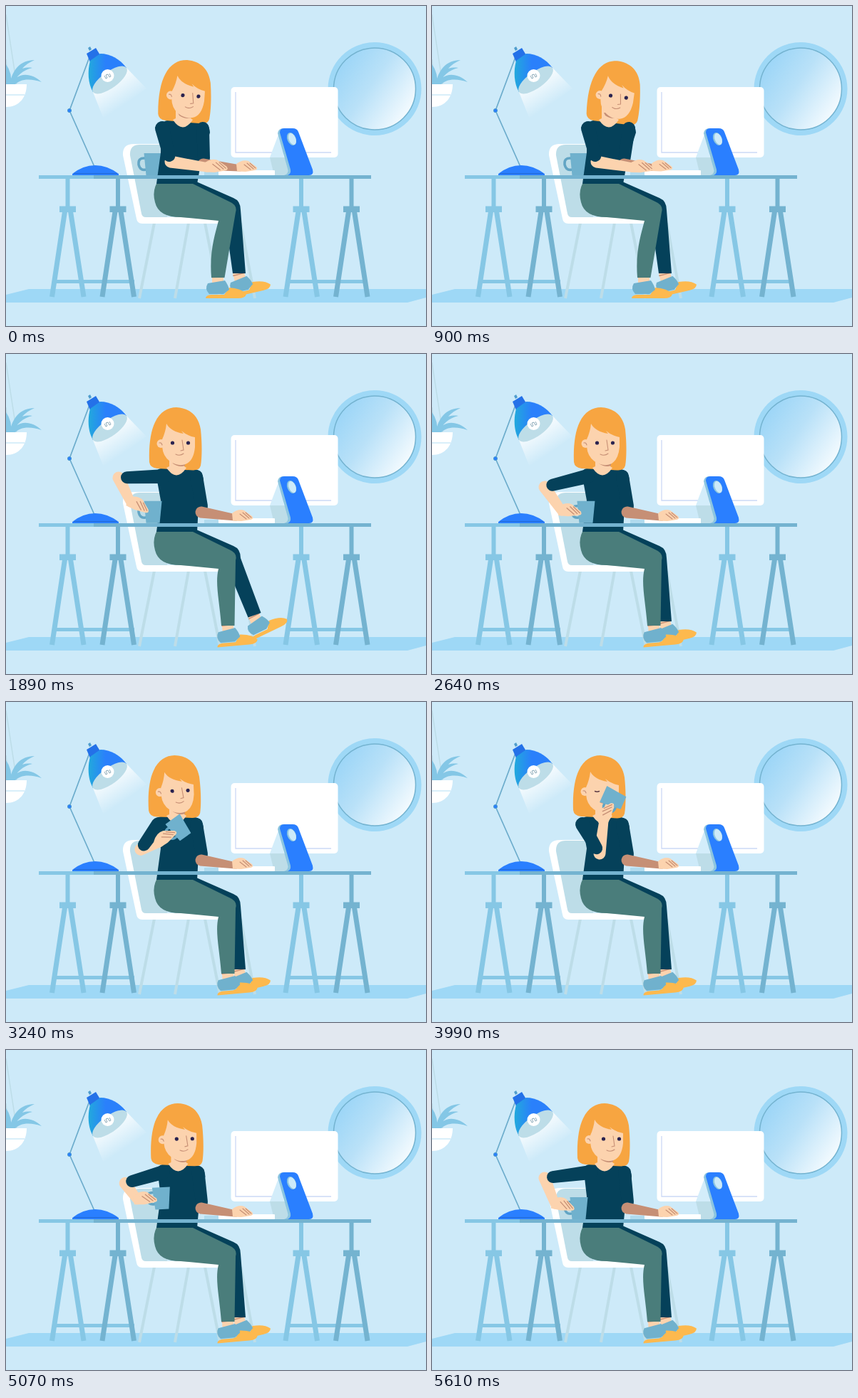
Write an HTML page that moves like this. It is 589 by 450 pixels and loops after 5.64 s.

```html
<!DOCTYPE html>
<html lang="en">
<head>
<meta charset="utf-8">
<title>At the desk</title>
<style>
html, body { margin: 0; width: 100%; height: 100%; overflow: hidden; background: #cdeaf9; }
svg { display: block; width: 589px; height: 450px; }
</style>
</head>
<body>
<svg viewBox="0 0 589 450" fill="none">
  <defs>
    <linearGradient id="glass" x1=".1" y1=".2" x2=".9" y2=".75">
      <stop stop-color="#9dd6f7"/><stop offset=".45" stop-color="#b9e1f8"/><stop offset="1" stop-color="#f0f9fe"/>
    </linearGradient>
    <linearGradient id="beam" gradientUnits="userSpaceOnUse" x1="146" y1="104" x2="168" y2="138">
      <stop stop-color="#fff" stop-opacity=".85"/><stop offset="1" stop-color="#fff" stop-opacity="0"/>
    </linearGradient>
    <linearGradient id="hood">
      <stop stop-color="#22a9dc"/><stop offset=".45" stop-color="#2a80fb"/>
    </linearGradient>
    <g id="trestle">
      <path d="M-3 243h6v39h-6zM-11.500 281.500h23v8.500h-23z" fill="currentColor"/>
      <path d="M-4 289L-22 409M4 289L22.500 409" stroke="currentColor" stroke-width="7"/>
    </g>
  </defs>

  <path d="M0 406L32 398H589V410L563 417H0z" fill="#9ed8f6"/>

  <circle cx="517" cy="116.500" r="65.500" fill="#9ed8f6"/>
  <circle cx="517" cy="116.500" r="57.500" fill="url(#glass)" stroke="#74b3d0" stroke-width="1.500"/>

  <path d="M0 12L15 111M0 75L3 111" stroke="#bddde8" stroke-width="1.500"/>
  <path d="M5 112C8 90 20 76 40 76C26 82 16 92 10 112zM5 112C10 90 24 85 37 87C24 90 14 98 9 112zM6 112C14 93 34 92 50 107C36 102 20 101 11 112zM0 82Q9 94 7 112H0z" fill="#84c7e6"/>
  <path d="M0 110H29C29 129 18 142 0 142z" fill="#fff"/>
  <path d="M0 125H26" stroke="#cdeaf9" stroke-width="1.500"/>

  <path d="M122 121L169 87L197 116L137 159z" fill="url(#beam)"/>
  <path d="M117 72L89 147L124 226" stroke="#6caccc" stroke-width="1.700"/>
  <circle cx="89" cy="147" r="2.600" fill="#2a7fff" stroke="#4f9dcc"/>
  <path d="M115 59l3-2 2 4-3 2z" fill="#4f9dcc"/>
  <path d="M113 67L126 59L132 69L118 79z" fill="#2471e8"/>
  <path d="M122 121C115 109 114 92 118 77L132 67C147 67 160 75 169 87z" fill="url(#hood)"/>
  <ellipse cx="145.500" cy="104" rx="29" ry="11.500" transform="rotate(-36 145.500 104)" fill="#bddde8"/>
  <circle cx="142.500" cy="98" r="9" fill="#fff"/>
  <path d="M138 98l2 4 2-1-2-4 3-1 2 4 2-1-2-4" stroke="#8aa9b8"/>
  <path d="M93 238V236Q108 224 125 224Q142 224 158 236V238z" fill="#2a7fff"/>
  <path d="M95 235.500H156" stroke="#1f68d8"/>

  <path d="M208 305L187 411M256 305L237 411M279 305L300 411M329 305L349 411" stroke="#bddde8" stroke-width="4"/>
  <path d="M164 210Q163 194 179 194H215V297H300V306H191Q184 306 183 299z" fill="#fff"/>
  <path d="M174 210Q173 195 188 195H226V297H196Q191 297 190 292z" fill="#bddde8"/>

  <path d="M67 387.500H180M396 387.500H507" stroke="#86c7e5" stroke-width="5"/>
  <g color="#86c7e5"><use href="#trestle" x="86.500"/><use href="#trestle" x="414"/></g>
  <g color="#74b3d0"><use href="#trestle" x="157"/><use href="#trestle" x="484.500"/></g>

  <g id="body"></g>

  <path d="M46 238H123V243H46z" fill="#86c7e5"/>
  <path d="M123 238H512V243H123z" fill="#74b3d0"/>
  <rect x="315.500" y="114" width="150" height="99" rx="5" fill="#fff"/>
  <path d="M322 121V206H456" stroke="#ccd9f6" stroke-width="1.300"/>
  <path d="M383 178L370 213H390z" fill="#d3edfa"/>
  <path d="M370 213H395V238H376z" fill="#bddde8"/>
  <path d="M381 179Q382 172 389 172H396L408 238H390Q397 236 395 229z" fill="#8cc5e0"/>
  <path d="M384 178Q384 172 390 172H402Q408 172 410 177L430 230Q432 238 425 238H395Q400 236 399 230z" fill="#2a7fff"/>
  <ellipse cx="400.500" cy="187" rx="6" ry="9.500" transform="rotate(-22 400.500 187)" fill="#8cc5e0"/>
  <ellipse cx="401.500" cy="187" rx="4.800" ry="8.500" transform="rotate(-22 401.500 187)" fill="#cdeaf9"/>
  <path d="M278 233H300V238H278z" fill="#b0daee"/>
  <rect x="298" y="231" width="79" height="7" rx="1" fill="#fff"/>

  <g id="arms"></g>
</svg>
<script>
const LOOP = 5640, GRAB = 1680;
const NAVY = '#05415a', GREEN = '#4a7d7b', SKIN = '#fcd3ae', SHADE = '#c68f75',
      HAIR = '#f7a541', TEAL = '#70b1cd', SHOE = '#fdb94e';

// The upper body: torso shift, head place and lean, gaze, shoulder, elbow, wrist, hand angle
const typing = { body: 9, headX: 12, headY: 1, lean: 2, gaze: 1, shoulder: 219,
                 elbowX: 231, elbowY: 219, wristX: 283, wristY: 227, angle: 0 };
const glance = { ...typing, headX: 15, headY: 2, lean: 4, gaze: -1 };
const hold = { body: 0, headX: 0, headY: 0, lean: 0, gaze: 0, shoulder: 222,
               elbowX: 158, elbowY: 174, wristX: 175, wristY: 209, angle: 24 };
const nudge = { ...hold, headX: -2, shoulder: 218, elbowY: 187, wristX: 182, wristY: 221, angle: 3 };
const lower = { ...hold, lean: -2, gaze: 2, shoulder: 211,
                elbowX: 208, elbowY: 220, wristX: 236, wristY: 183, angle: -60 };
const sip = { ...lower, headX: -3, lean: 0, gaze: 1, elbowX: 235, elbowY: 213, wristX: 241, wristY: 167, angle: -66 };
const place = { ...hold, body: 3, headX: 3, gaze: 4, elbowY: 180, wristX: 172.5, wristY: 217, angle: 10 };

const MOVES = [
  [glance, 0, 500], [hold, 1120, GRAB], [nudge, 2300, 2620], [lower, 2720, 3620],
  [sip, 3500, 3850], [lower, 4350, 4680], [place, 4650, 5230]
];

function ease(t, from, to) {
  const u = Math.min(1, Math.max(0, (t - from) / (to - from)));
  return u * u * (3 - 2 * u);
}

function poseAt(t) {
  const pose = { ...typing };
  for (const [goal, from, to] of MOVES)
    for (const k in pose) pose[k] += (goal[k] - pose[k]) * ease(t, from, to);
  return pose;
}

const path = (d, fill) => `<path d="${d}" fill="${fill}"/>`;
const line = (d, color = SHADE, w = 1.1) =>
  `<path d="${d}" stroke="${color}" stroke-width="${w}" stroke-linecap="round"/>`;
const dot = (x, y, r, fill) => `<circle cx="${x}" cy="${y}" r="${r}" fill="${fill}"/>`;
const at = (x, y, turn, inner, size = 1) =>
  `<g transform="translate(${x} ${y}) rotate(${turn}) scale(${size})">${inner}</g>`;

// tapered limb with round ends
function limb(x1, y1, r1, x2, y2, r2, fill) {
  const a = Math.atan2(y2 - y1, x2 - x1), nx = -Math.sin(a), ny = Math.cos(a);
  return path(`M${x1 + nx * r1} ${y1 + ny * r1}A${r1} ${r1} 0 0 1 ${x1 - nx * r1} ${y1 - ny * r1}` +
    `L${x2 - nx * r2} ${y2 - ny * r2}A${r2} ${r2} 0 0 1 ${x2 + nx * r2} ${y2 + ny * r2}z`, fill);
}

const hand = (x, y, turn, size) => at(x, y, turn,
  path('M-5 -5Q4 -12 12 -9L23 -1Q26 3 21 4L8 6L-4 5.500z', SKIN) +
  line('M6 -4L15 3M10 -6L19 2M14 -6L22 1'), size);

const mug = (x, y, turn) => at(x, y, turn,
  line('M-11 -9Q-21 -10 -20 0Q-18 9 -9 7', '#62a5c4', 3.5) +
  path('M-12.500 -16H12.500L9.500 15H-9.500z', TEAL));

function heldMug({ wristX, wristY, angle }) {
  const a = angle * Math.PI / 180;
  return mug(wristX + 34 * Math.cos(a), wristY + 34 * Math.sin(a), Math.min(0, angle));
}

const foot = (x, y, turn) => at(x, y, turn,
  path('M-8 -5H8V8H-8z', SKIN) + line('M-8 -1.500L8 -2', SHADE, 1.5) +
  path('M-17 28Q-17 24 -10 23H9L16 13Q33 14 40 22Q39 28 28 28z', SHOE) +
  path('M-14 7L10 3Q15 10 16 16L8 22H-12Q-19 15 -14 7z', TEAL));

function legs(t) {
  const kick = ease(t, 1500, 2050) - ease(t, 2280, 2620), shift = ease(t, 1120, 1700);
  const fx = 297 + 14 * shift, bx = 327 + 27 * kick, by = 379 - 11 * kick, tilt = 4 * kick;
  return foot(bx, by, -13 - 16 * kick) +
    path(`M255 245L267 247L319 270Q329 274 329 287L${bx + 9} ${by - 3 - tilt}L${bx - 9} ${by - 3 + tilt}L306 290z`, NAVY) +
    foot(fx, 383, -5 * shift) +
    path(`M211 250Q205 262 209 276Q214 297 245 297L298 302C293 322 ${fx - 12} 345 ${fx - 9} 382` +
      `L${fx + 9.5} 382L322 290Q325 280 313 275L260 249z`, GREEN);
}

const torso = d => path(
  `M${225 + d} 160H${253 + d}L${265 + d} 162Q${276 + d} 164 ${277 + d} 178L${270 + d / 2} 214` +
  `L268 250H211L217 206L${213 + d / 2} 184L${210 + d} 168Q${211 + d} 162 ${217 + d} 161z`, NAVY);

function head(t, { body: d, headX, headY, lean, gaze }) {
  const shut = t > 3650 && t < 4450;
  const eye = x => shut ? line(`M${x - 3} 125.500Q${x} 127 ${x + 3} 125.500`, '#5b3a44', 1.4)
                        : dot(x, 125, 2.6, '#2a2350');
  const tilted = inner => `<g transform="translate(${headX} ${headY}) rotate(${lean} 238 160)">${inner}</g>`;
  const hair = path('M201 152C200 128 203 108 209 96C216 81 227 75 239 75C258 76 270 87 273 106' +
    'C275 125 275 145 273 157Q271 164 262 163.500L212 161Q202 160 201 152z', HAIR);
  const neck = path(`M${229 + d} 142H${250 + d}V158L${253 + d} 160Q${239 + d} 181 ${225 + d} 160L${229 + d} 158z`, SKIN) +
    path(`M${232 + d} 150H${251 + d}V157Q${243 + d} 160 ${234 + d} 154z`, SHADE);
  const face = dot(217.5, 126, 6, SKIN) +
    path('M219 120Q224 109 225 98Q231 109 249 112L246 108Q254 115 265 117V131Q263 152 250 155.500Q240 158 230 151Q220 144 219 130z', SKIN) +
    line('M215 125Q218 124 219 128') +
    `<g transform="translate(${gaze})">` + eye(233.5) + eye(255.5) +
    line('M247 121L249 135L245 136') + line('M238 141Q244 144 249 140') + '</g>';
  return tilted(hair) + neck + tilted(`<g transform="rotate(${lean} 243 132)">${face}</g>`);
}

function farArm(t, d) {
  const busy = 1 - ease(t, 1140, 1440);
  const x = 322 + busy * (7.5 * Math.cos(t * Math.PI / 300) - 1.5);
  const y = 229 + busy * (Math.sin(t / 40) - 2);
  const elbow = 270 + (x - 313) / 2;
  return limb(267 + d, 172, 9, elbow, 214, 8.5, NAVY) +
    limb(elbow - 1, 222.5, 8, x, y + 1, 4.5, SHADE) + hand(x, y, 0, 1);
}

function nearArm(t, { shoulder, elbowX, elbowY, wristX, wristY, angle }) {
  const top = 172, cuff = .82, y = wristY + Math.sin(t / 35) * .8 * (1 - ease(t, 1000, 1140));
  return limb(elbowX, elbowY, 8.5, wristX, y, 6.5, SKIN) +
    limb(shoulder, top, 10, shoulder + (elbowX - shoulder) * cuff, top + (elbowY - top) * cuff, 8.5, NAVY) +
    hand(wristX, y, angle, 1.15);
}

const body = document.getElementById('body'), arms = document.getElementById('arms');

function draw() {
  const t = performance.now() % LOOP, pose = poseAt(t), held = t > GRAB;
  body.innerHTML = (held ? '' : mug(206, 223, 0)) + legs(t) + torso(pose.body) + head(t, pose);
  arms.innerHTML = farArm(t, pose.body) + (held ? heldMug(pose) : '') + nearArm(t, pose);
  requestAnimationFrame(draw);
}
draw();
</script>
</body>
</html>
```
